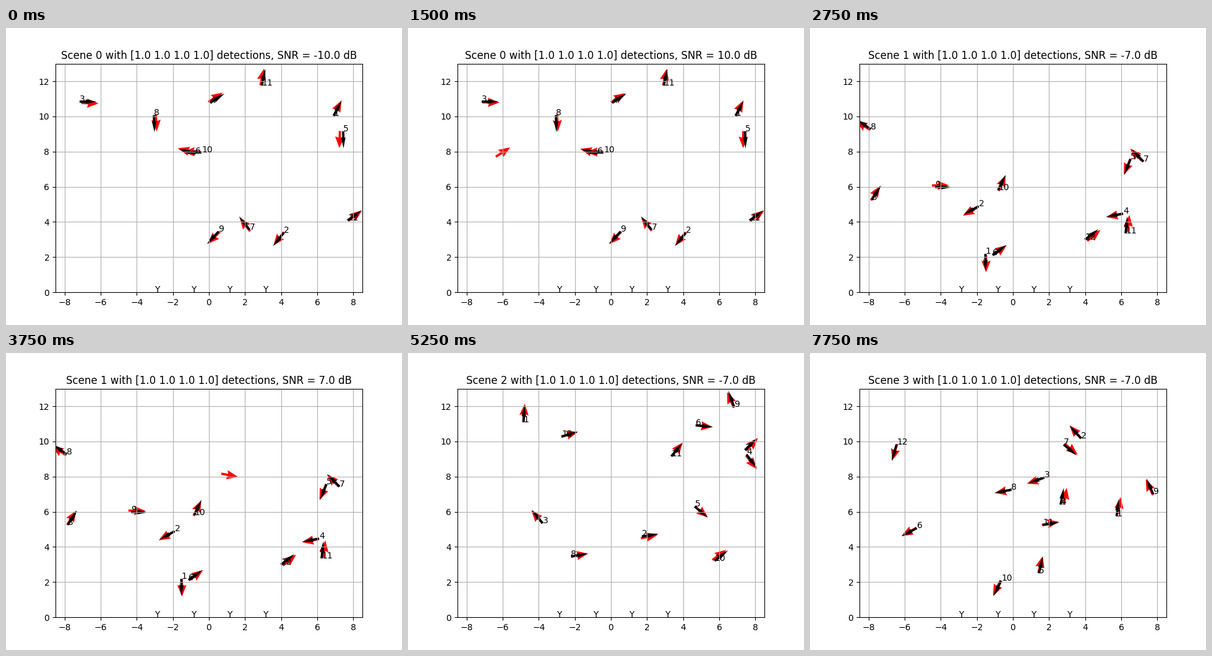
Animation of 640 by 480 pixels, one loop 8000 ms. Source, as a matplotlib script:

```python
import numpy as np
import matplotlib.pyplot as plt
from matplotlib.animation import FuncAnimation

W, H, DPI = 640, 480, 100
STEPS = 10                      # noise levels per scene
FRAMES, INTERVAL = 32, 250
XLIM, YLIM = (-8.5, 8.5), (0, 13)
SNR = np.round(np.linspace(-10, 20, STEPS))
GHOST_SNR = 5                   # false alarms show above this level

# True poses per scene: tail on the stage in pixels, heading in degrees.
TRUTH = [
    [(529.5, 142, 62), (449, 331, -129), (119, 119, 0), (330, 121, 33),
     (545, 167, -89), (306, 203, 165), (393.5, 326, 128), (239, 141, -88),
     (343.5, 329, -133), (316, 201, 180), (413.5, 93, 78), (552, 311, 36)],
    [(283.5, 365, -90), (272.5, 288, -151), (100, 277.5, 57), (506, 300, -170),
     (518, 212, -112), (295, 367, 36), (539, 216, 134), (98, 163.5, 145),
     (202, 257, -1), (304, 262, 64), (510, 332, 84), (444.5, 342, 38)],
    [(186.5, 112, 86), (378, 296.5, 9), (217.5, 275, 129), (547, 164, -52),
     (463.5, 248, -41), (465.5, 117, -5), (544.5, 157, 45), (263.5, 329, 10),
     (527, 87, 110), (495.5, 336, 38), (425.5, 167, 50), (248, 135, 16)],
    [(495.5, 264, 83), (438, 138, 132), (379, 201, -160), (405, 245, 79),
     (370, 356, 77), (172.5, 283, -151), (410, 148, -40), (325, 221, -169),
     (554.5, 228, 113), (309, 368, -116), (376, 278, 9), (140, 148, -107)],
]
GHOSTS = [(142, 208, 33), (348, 195, -11), (200, 207, -158)]

# No pair kerning between letters.
plt.rcParams["text.kerning_factor"] = 6
fig, ax = plt.subplots(figsize=(W / DPI, H / DPI), dpi=DPI)


def to_data(x, y):
    box = ax.get_position()
    u = (x / W - box.x0) / box.width
    v = (1 - y / H - box.y0) / box.height
    return (XLIM[0] + u * (XLIM[1] - XLIM[0]),
            YLIM[0] + v * (YLIM[1] - YLIM[0]))


def draw_arrows(arrows, color, headwidth):
    x, y, heading = np.array(arrows, float).T
    x, y = to_data(x, y)
    a = np.radians(heading)
    ax.quiver(x, y, np.cos(a), np.sin(a), color=color, scale=18,
              width=0.0075, headwidth=headwidth)
    return x, y


def estimates(scene, step):
    """True poses with a fixed bias and a jitter that fades as SNR grows."""
    truth = np.array(TRUTH[scene], float)
    bias = np.random.default_rng(scene).normal(0, 1.3, truth.shape)
    jitter = np.random.default_rng([scene, step]).normal(0, 1, truth.shape)
    found = truth + bias + jitter * 10 ** (-(SNR[step] + 10) / 40)
    if SNR[step] > GHOST_SNR and scene < len(GHOSTS):
        found = np.vstack([found, GHOSTS[scene]])
    return found


def update(i):
    scene, step = divmod(i, STEPS)
    ax.clear()
    ax.set(xlim=XLIM, ylim=YLIM, xticks=range(-8, 9, 2), yticks=range(0, 13, 2))
    ax.grid(True)
    ax.set_title(f"Scene {scene} with [1.0 1.0 1.0 1.0] detections, "
                 f"SNR = {SNR[step]:.1f} dB")
    draw_arrows(estimates(scene, step), "red", 4)
    x, y = draw_arrows(TRUTH[scene], "black", 2)
    for k in range(len(x)):
        ax.text(x[k], y[k], str(k + 1))
    for antenna in (-3, -1, 1, 3):
        ax.text(antenna, 0, "Y")
    return []


anim = FuncAnimation(fig, update, frames=FRAMES, interval=INTERVAL,
                     init_func=lambda: [], repeat=True, repeat_delay=0)
plt.show()
```
